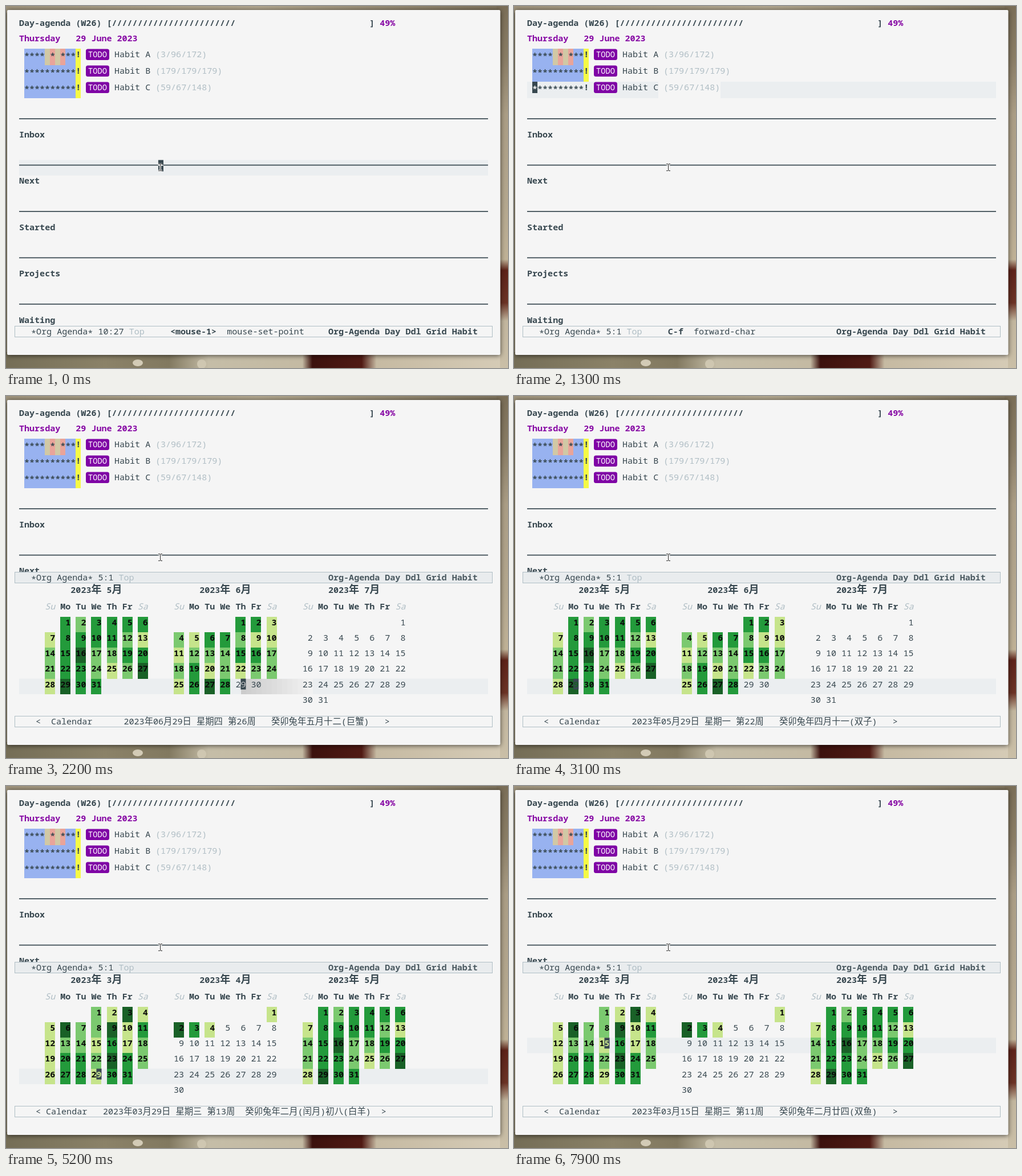
Write an HTML page with a canvas that moves like this. It is 880x636 px and loops after 8 s.

```html
<!DOCTYPE html>
<html lang="en">
<head>
<meta charset="utf-8">
<title>Agenda and calendar</title>
<style>
html, body { margin: 0; width: 100%; height: 100%; overflow: hidden; }
canvas { display: block; }
</style>
</head>
<body>
<canvas id="stage" width="880" height="636"></canvas>
<script>
const ctx = document.getElementById('stage').getContext('2d');
const LOOP = 8000, LEFT = 23, RIGHT = 845, CELL = 9.033, ROW = 27.15;
const BG = '#f5f5f5', INK = '#37474f', FADED = '#b0bec5', HILITE = '#ebeef0', PURPLE = '#8608a4';
const HEAT = [null, '#c6e48b', '#7bc96f', '#239a3b', '#196127'];
const col = n => LEFT + n * CELL;

// Start time, line and column of the agenda cursor
const agenda = [[0, 10, 27], [200, 9, 0], [400, 8, 0], [600, 7, 0], [700, 6, 0], [900, 5, 0], [1300, 5, 1]];

// Start time, first month shown, selected month and day, lunar date, summary delay and count
const calendar = [
  [2000, 5, 6, 29, '癸卯兔年五月十二(巨蟹)'],
  [3100, 5, 5, 29, '癸卯兔年四月十一(双子)'],
  [3400, 3, 4, 29, '癸卯兔年三月初十(金牛)'],
  [5200, 3, 3, 29, '癸卯兔年二月(闰月)初八(白羊)', 900, 1],
  [6900, 3, 3, 22, '癸卯兔年二月(闰月)初一(白羊)', 500, 2],
  [7900, 3, 3, 15, '癸卯兔年二月廿四(双鱼)']
];

// One activity level per day of the month
const levels = {
  3: '2141' + '1422413' + '1221312' + '1332432' + '133133',
  4: '1431',
  5: '323333' + '1333321' + '2342233' + '2332124' + '1433',
  6: '331' + '2133211' + '1222332' + '2312122' + '1343',
  7: ''
};

const current = (list, t) => list.filter(e => e[0] <= t).pop();

function rect(x, y, w, h, color) {
  ctx.fillStyle = color;
  ctx.fillRect(x, y, w, h);
}

// Draws mixed Latin and Han text on a baseline and returns the x where it ends
function text(x, y, str, { color = INK, style = '', size = 15.055, han = 15.36 } = {}) {
  ctx.fillStyle = color;
  for (const run of str.match(/\p{Script=Han}+|\*+|[^*\p{Script=Han}]+/gu)) {
    const isHan = /\p{Script=Han}/u.test(run);
    ctx.font = isHan
      ? `${style} ${han}px "Noto Sans CJK SC", "Noto Sans CJK JP", sans-serif`
      : `${style} ${size}px "Noto Sans Mono", "DejaVu Sans Mono", monospace`;
    ctx.fillText(run, x, run[0] === '*' ? y + 3 : y);
    x += run.length * (isHan ? han : size * 0.6);
  }
  return x;
}
const bold = (x, y, str, color = INK) => text(x, y, str, { color, style: 'bold' });

function gradient(x, y, w, h, colors, vertical) {
  const g = vertical ? ctx.createLinearGradient(0, y, 0, y + h) : ctx.createLinearGradient(x, 0, x + w, 0);
  colors.forEach(([at, c]) => g.addColorStop(at, c));
  rect(x, y, w, h, g);
}

function blob(x, y, rx, ry, color) {
  ctx.fillStyle = color;
  ctx.beginPath();
  ctx.ellipse(x, y, rx, ry, 0, 0, 7);
  ctx.fill();
}

function wallpaper() {
  rect(0, 0, 880, 636, '#8f866f');
  gradient(0, 0, 880, 12, [[0, '#a0957d'], [0.5, '#b3a88f'], [1, '#7d725b']]);
  gradient(860, 0, 20, 636, [[0, '#7a6e57'], [0.15, '#8b7e66'], [0.3, '#aa9d85'], [0.55, '#b4a78e'],
    [0.7, '#bfb196'], [0.73, '#5d2218'], [0.82, '#6b3325'], [0.87, '#c2b69e'], [1, '#cabfa7']], true);
  gradient(0, 608, 866, 28, [[0, '#746d56'], [0.2, '#8b8268'], [0.33, '#827960'], [0.41, '#c5bda7'],
    [0.6, '#c4baa3'], [0.62, '#3c110d'], [0.72, '#501a14'], [0.75, '#c6baa2'], [1, '#d5cbb6']]);
  blob(231, 627, 9, 6, '#d3cbb6');
  blob(343, 629, 8, 8, '#cfc7b1');
}

function frame() {
  ctx.save();
  ctx.shadowColor = 'rgba(0,0,0,.65)';
  ctx.shadowBlur = 9;
  ctx.shadowOffsetY = 1;
  ctx.fillStyle = BG;
  ctx.beginPath();
  ctx.roundRect(2, 7, 864.5, 606, 2);
  ctx.fill();
  ctx.restore();
}

function bar(y, fill) {
  rect(15, y, 838, 20, FADED);
  rect(16, y + 1, 836, 18, fill);
}

function habit(i, name, stars, tally, active) {
  const y = 75 + 29 * i;
  if (active) {
    rect(LEFT, y, 230, 29, HILITE);
    rect(362, y, RIGHT - 362, 29, HILITE);
  } else {
    rect(32, y, 90, 29, '#98b2f0');
    if (i === 0) for (let k = 4; k < 8; k++) rect(32 + 9 * k, y, 9, 29, k % 2 ? '#e9a49a' : '#d1c8a5');
    rect(122, y, 9, 29, '#f5f946');
  }
  bold(32, y + 15, stars);
  ctx.fillStyle = '#7f04a5';
  ctx.beginPath();
  ctx.roundRect(140, y + 0.5, 41, 19.5, 3.5);
  ctx.fill();
  text(144, y + 15, 'TODO', { color: '#fff', size: 13.7, style: '500' });
  text(190, y + 15, name);
  text(262, y + 15, tally, { color: FADED });
}

function agendaView(line, column, focused) {
  const top = line > 5 ? 162 + ROW * (line - 6) : 133;
  if (focused && line > 5) rect(LEFT, top, RIGHT - LEFT, ROW, HILITE);

  bold(LEFT, 35, 'Day-agenda (W26) [' + '/'.repeat(24));
  bold(col(68), 35, ']');
  bold(col(70), 35, '49%', PURPLE);
  bold(LEFT, 62, 'Thursday   29 June 2023', PURPLE);
  habit(0, 'Habit A', '**** * ***!', '(3/96/172)');
  habit(1, 'Habit B', '**********!', '(179/179/179)');
  habit(2, 'Habit C', '**********!', '(59/67/148)', focused && line === 5);
  ['Inbox', 'Next', 'Started', 'Projects', 'Waiting'].forEach((name, i) => {
    rect(LEFT, 197.3 + 81.4 * i, RIGHT - LEFT, 1.7, INK);
    bold(LEFT, 231 + 81.4 * i, name);
  });

  if (!focused) return;
  const x = col(column);
  rect(x, top, CELL, 20, INK);
  if (line === 8) bold(x, 231, 'I', BG);
  if (line === 5 && column) bold(x, 148, '*', BG);
  if (line === 7 || line === 10) rect(x, top + 8.5, CELL, 1.5, BG);
}

function agendaBar(y, [, line, column], focused) {
  bar(y, focused ? BG : '#e9ecee');
  let x = text(44, y + 15, `*Org Agenda* ${line}:${column} `);
  x = text(x, y + 15, 'Top', { color: FADED });
  if (focused) {
    const [key, command] = line === 10 ? ['<mouse-1>', 'mouse-set-point']
      : column ? ['C-f', 'forward-char'] : ['C-p', 'org-agenda-previous-line'];
    x = bold(x + 5 * CELL, y + 15, key);
    x = text(x + 2 * CELL, y + 15, command);
    if (line < 9 && !column) x = text(x, y + 15, ' x' + (10 - line));
  }
  bold(Math.max(565, x + 2 * CELL), y + 15, 'Org-Agenda Day Ddl Grid Habit', focused ? INK : '#4a5960');
}

const beaconColor = i => {
  const v = Math.round(127 + 118 * i / 40);
  return `rgb(${v},${v},${v})`;
};

function monthView(x, month, selected) {
  text(x + 5 * CELL, 346, `2023年 ${month}月`, { style: 'bold', han: 18.07 });
  ['Su', 'Mo', 'Tu', 'We', 'Th', 'Fr', 'Sa'].forEach((name, i) => {
    const weekend = i % 6 === 0;
    text(x + i * 3 * CELL, 375, name, { color: weekend ? FADED : INK, style: weekend ? 'italic' : 'bold' });
  });
  const offset = new Date(2023, month - 1, 1).getDay();
  const days = new Date(2023, month, 0).getDate();
  for (let day = 1; day <= days; day++) {
    const slot = offset + day - 1;
    const cx = x + (slot % 7) * 3 * CELL;
    const cy = 388 + Math.floor(slot / 7) * ROW;
    const heat = HEAT[levels[month][day - 1]];
    if (heat) rect(Math.round(cx), Math.round(cy), 18, Math.round(cy + ROW) - Math.round(cy), heat);
    const style = heat ? 'bold' : '', color = heat ? '#0a0a0a' : INK;
    text(cx, cy + 15, String(day).padStart(2), { color, style });
    if (day === selected) {
      rect(cx + CELL, cy, CELL, 19, INK);
      text(cx + CELL, cy + 15, String(day % 10), { color: heat || '#c8c8c8', style });
    }
  }
}

function calendarView(t, [start, first, month, day, lunar, delay, count]) {
  rect(15, 309, 838, 255, BG);
  const date = new Date(2023, month - 1, day);
  const slot = new Date(2023, month - 1, 1).getDay() + day - 1;
  rect(LEFT, 388 + Math.floor(slot / 7) * ROW, RIGHT - LEFT, ROW, HILITE);

  // Pulse of light that shrinks and dims beside the cursor
  const popped = 13 * Math.floor((t - 2000) / 100);
  if (popped < 39) {
    for (let i = 0; i < 40 - popped; i++) {
      const x = Math.round(412 + i * CELL);
      rect(x, 497, Math.round(412 + (i + 1) * CELL) - x, 27, beaconColor(i + popped));
    }
  }
  for (let i = 0; i < 3; i++) monthView(col(5 + 25 * i), first + i, first + i === month && day);

  bar(562, BG);
  const tight = lunar.includes('闰');
  const gap = (tight ? 2 : 3) * CELL;
  const week = Math.ceil((Date.UTC(2023, month - 1, day) - Date.UTC(2023, 0, 1)) / 864e5 / 7);
  const pad = n => String(n).padStart(2, '0');
  text(52, 577, '<');
  text(tight ? 70 : 79, 577, 'Calendar');
  let x = text(tight ? 170 : 206.5, 577,
    `2023年${pad(month)}月${pad(day)}日 星期${'日一二三四五六'[date.getDay()]} 第${week}周`);
  x = text(x + gap, 577, lunar);
  text(x + gap, 577, '>');
  if (t >= start + delay) text(LEFT, 597, `Wednesday, ${day} March 2023: ${count} habits`);
}

function pointer() {
  rect(266.5, 276.5, 3.5, 3, '#fff');
  rect(270.5, 276.5, 3.5, 3, '#fff');
  rect(266.5, 288, 3.5, 3, '#fff');
  rect(270.5, 288, 3.5, 3, '#fff');
  rect(269, 278, 3, 12, '#fff');
  rect(267, 277, 3, 1, '#222');
  rect(271, 277, 3, 1, '#222');
  rect(267, 289, 3, 1, '#222');
  rect(271, 289, 3, 1, '#222');
  rect(270, 278, 1, 11, '#222');
}

function draw(t) {
  const spot = current(agenda, t);
  const focused = t < 2000;
  wallpaper();
  frame();
  agendaView(spot[1], spot[2], focused);
  if (focused) {
    agendaBar(562, spot, true);
    if (spot[1] === 5 && !spot[2]) text(LEFT, 597, 'habits/Habit C');
  } else {
    calendarView(t, current(calendar, t));
    agendaBar(309, spot, false);
  }
  pointer();
}

const begin = performance.now();
(function tick() {
  draw((performance.now() - begin) % LOOP);
  requestAnimationFrame(tick);
})();
</script>
</body>
</html>
```
